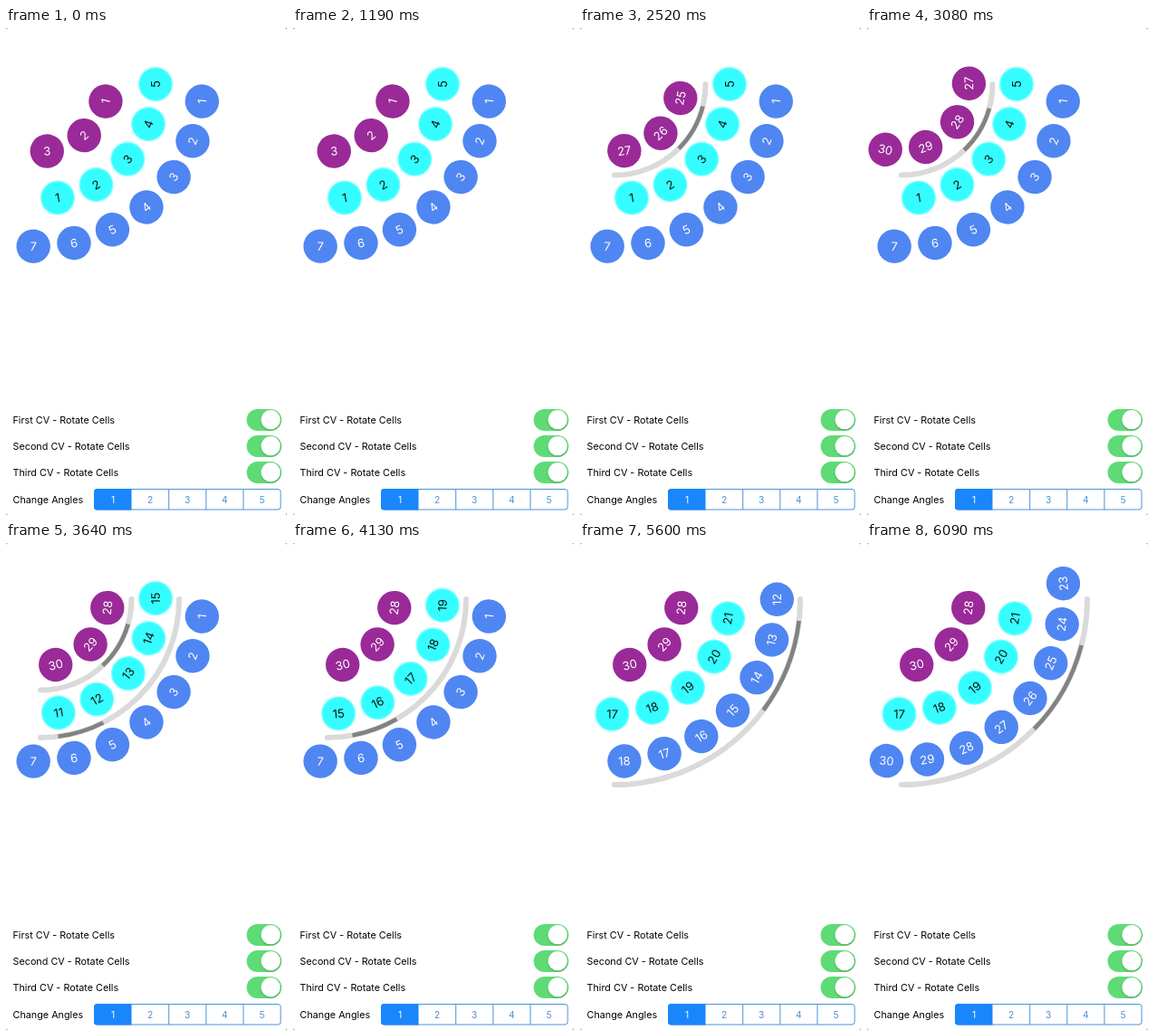
Recreate the animation shown at these times as an HTML page. Size 310 by 538 pixels, loop 6.16 s.

```html
<!DOCTYPE html>
<html lang="en">
<head>
<meta charset="utf-8">
<title>Circular scrolling</title>
<style>
  html, body { margin: 0; width: 100%; height: 100%; overflow: hidden; background: #999; }
  svg { display: block; width: 310px; height: 538px; }
  text { font-family: Inter, Roboto, sans-serif; font-size: 10.8px; }
  .cell text { font-size: 13px; text-anchor: middle; }
  .track { fill: none; stroke: #dadada; stroke-width: 6; stroke-linecap: round; }
  .thumb { fill: none; stroke: #828282; stroke-width: 4.6; }
  .segment { fill: none; stroke: #4a92d6; }
  .segment-text { text-anchor: middle; fill: #4a92d6; font-size: 10.2px; }
  .knob { fill: #fff; filter: drop-shadow(0 1.5px 1px rgba(0, 0, 0, .25)); }
</style>
</head>
<body>
<svg id="stage" viewBox="0 0 310 538">
  <rect width="310" height="538" rx="3" fill="#fff"/>
  <g id="rings" transform="translate(38 62)"></g>
  <g id="controls"></g>
</svg>
<script>
const LOOP = 6160, STEP = 70, DECAY = 500, COUNT = 30;

// Angles are in degrees, counted from straight down towards the right.
// A drag speeds up until `release`, then the ring glides towards `goal`, with `glide` left to go.
const rings = [
  { radius: 74.4, track: 100.5, first: 75.2, step: -34.8, fill: '#9a2a98', ink: '#fff',
    release: 1540, goal: 960, glide: 866, stop: 947, hide: 3700,
    thumb: 90, thumbRate: -0.0168, thumbSize: -31 },
  { radius: 127, track: 153, first: 8.6, step: 20.35, fill: '#35fdff', ink: '#111', rim: '#7dffff',
    release: 3250, goal: 339, glide: 296.5, stop: 335.3, hide: 5250,
    thumb: 0, thumbRate: 0.036, thumbSize: 19.6 },
  { radius: 179.3, track: 205, first: 83.9, step: -14.4, fill: '#4f86f2', ink: '#fff',
    release: 5410, goal: 427, glide: 384, stop: 340, hide: Infinity,
    thumb: 91, thumbRate: -0.0469, thumbSize: -30 }
];

const clamp = x => Math.max(0, Math.min(1, x));

function add(parent, tag, attrs, text) {
  const el = document.createElementNS('http://www.w3.org/2000/svg', tag);
  for (const key in attrs) el.setAttribute(key, attrs[key]);
  if (text !== undefined) el.textContent = text;
  parent.appendChild(el);
  return el;
}

function arc(r, from, to) {
  const point = deg => {
    const a = deg * Math.PI / 180;
    return `${(r * Math.sin(a)).toFixed(2)} ${(r * Math.cos(a)).toFixed(2)}`;
  };
  return `M${point(from)}A${r} ${r} 0 0 ${to > from ? 0 : 1} ${point(to)}`;
}

function buildRing(ring) {
  const root = document.getElementById('rings');
  ring.bar = add(root, 'g', { opacity: 0 });
  add(ring.bar, 'path', { class: 'track', d: arc(ring.track, 0, 90) });
  ring.thumbEl = add(ring.bar, 'path', { class: 'thumb' });
  ring.cells = Array.from({ length: COUNT }, (_, i) => {
    const cell = add(root, 'g', { class: 'cell' });
    add(cell, 'circle', ring.rim
      ? { r: 18.3, fill: ring.fill, stroke: ring.rim, 'stroke-width': 1.4 }
      : { r: 18.7, fill: ring.fill });
    add(cell, 'text', { y: 4.7, fill: ring.ink }, i + 1);
    return cell;
  });
  ring.dragged = ring.goal - ring.glide;
  ring.dragTime = 2 * ring.dragged * DECAY / ring.glide;
}

function buildControls() {
  const root = document.getElementById('controls');
  ['First', 'Second', 'Third'].forEach((name, i) => {
    const y = 433 + 29 * i;
    add(root, 'text', { x: 7.5, y: y + 4 }, `${name} CV - Rotate Cells`);
    add(root, 'rect', { x: 265.5, y: y - 12, width: 38.5, height: 24, rx: 12, fill: '#5fdb76' });
    add(root, 'circle', { class: 'knob', cx: 292, cy: y - 0.3, r: 10.6 });
  });
  add(root, 'text', { x: 7.5, y: 524.7 }, 'Change Angles');
  add(root, 'rect', { class: 'segment', x: 97.5, y: 509.5, width: 205.5, height: 22.5, rx: 3 });
  add(root, 'path', { fill: '#1986fb', d: 'M138.5 509H100.5a3.5 3.5 0 0 0-3.5 3.5v16.5a3.5 3.5 0 0 0 3.5 3.5h38z' });
  for (let i = 0; i < 5; i++) {
    const x = 97.5 + 41.1 * i;
    if (i > 1) add(root, 'path', { class: 'segment', d: `M${x} 509.5v22.5` });
    add(root, 'text', { class: 'segment-text', x: x + 20.5, y: 524.5, style: i ? '' : 'fill:#fff' }, i + 1);
  }
}

function scrolled(ring, t) {
  const since = t - ring.release;
  if (since < 0) return ring.dragged * clamp(1 + since / ring.dragTime) ** 2;
  return Math.min(ring.stop, ring.goal - ring.glide * Math.exp(-since / DECAY));
}

function drawRing(ring, t) {
  const offset = scrolled(ring, t);
  const margin = Math.abs(ring.step) / 2;
  ring.cells.forEach((cell, i) => {
    const angle = ring.first + ring.step * i - Math.sign(ring.step) * offset;
    const shown = angle > -margin && angle < 90 + margin;
    cell.style.display = shown ? '' : 'none';
    if (shown) cell.setAttribute('transform', `rotate(${-angle}) translate(0 ${ring.radius})`);
  });
  const start = ring.thumb + ring.thumbRate * offset;
  ring.thumbEl.setAttribute('d', arc(ring.track, start, start + ring.thumbSize));
  const fadeIn = clamp((t - ring.release + ring.dragTime) / 100);
  const fadeOut = clamp(1 - (t - ring.hide) / 220);
  ring.bar.setAttribute('opacity', Math.min(fadeIn, fadeOut));
}

rings.forEach(buildRing);
buildControls();

const began = performance.now();
function frame() {
  const t = (performance.now() - began) % LOOP;
  const tick = Math.floor(t / STEP) * STEP;
  rings.forEach(ring => drawRing(ring, tick));
  requestAnimationFrame(frame);
}
frame();
</script>
</body>
</html>
```
